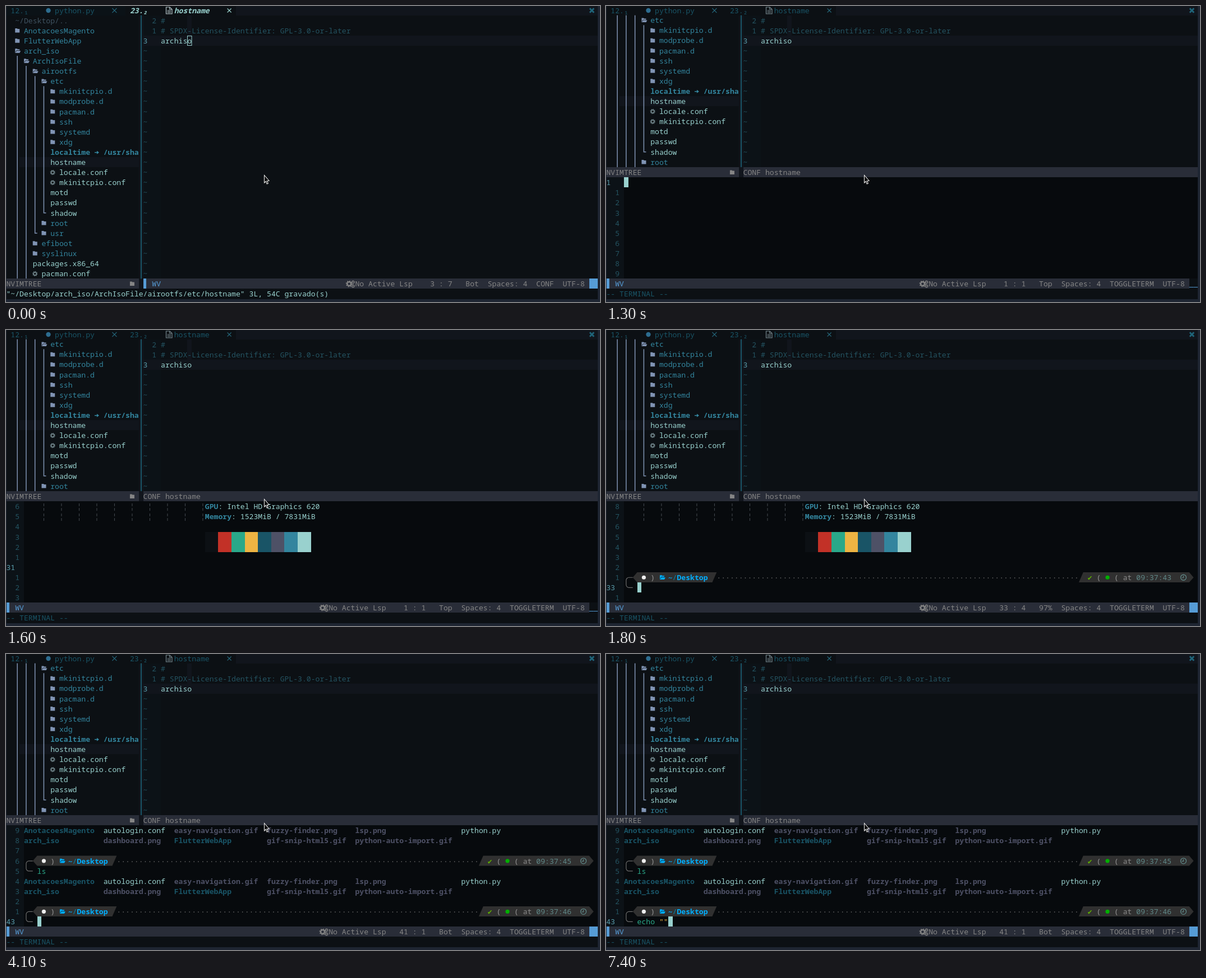
Recreate the animation shown at these times as an HTML page with a canvas. Size 1059x529 px, loop 8000 ms.

```html
<!DOCTYPE html>
<html lang="en">
<head>
<meta charset="utf-8">
<title>Editor with terminal</title>
<style>
html, body { margin: 0; width: 100%; height: 100%; overflow: hidden; background: #0c1014; }
canvas { display: block; }
</style>
</head>
<body>
<canvas id="stage" width="1059" height="529"></canvas>
<script>
const g = document.getElementById('stage').getContext('2d');
const CW = 7.873, RH = 18.1, LOOP = 8000;
const BG = '#0c1014', RAISED = '#11151c', GUTTER = '#0c1217', TERM = '#070a0d', BAR = '#292d38',
  FG = '#99d1ce', CYAN = '#33859e', BLUE = '#195466', DIM = '#245361', NUM = '#599cab', GREY = '#858585',
  RED = '#c23127', GREEN = '#2aa889', YELLOW = '#edb443', VIOLET = '#4e5166', STEEL = '#8094b4',
  ACCENT = '#569cd6', SEG = '#303030', SKY = '#00afff';

const X = col => 0.5 + col * CW;
const Y = row => row * RH - 1.5;
const MX = col => X(col + 0.5);
const MY = row => Y(row + 0.5) + 0.3;

function text(row, col, str, color, style = '') {
  g.font = `${style} 13.12px "Noto Sans Mono", "DejaVu Sans Mono", monospace`;
  g.fillStyle = color;
  const y = Math.round(Y(row) + 14);
  [...str].forEach((ch, i) => ch !== ' ' && g.fillText(ch, X(col + i), y));
}
function box(row, col, cols, rows, color) {
  const x = Math.round(X(col)), y = Math.round(Y(row));
  g.fillStyle = color;
  g.fillRect(x, y, Math.round(X(col + cols)) - x, Math.round(Y(row + rows)) - y);
}
function poly(color, ...p) {
  g.fillStyle = color;
  g.beginPath();
  for (let i = 0; i < p.length; i += 2) g.lineTo(p[i], p[i + 1]);
  g.fill();
}
function line(color, width, ...p) {
  g.strokeStyle = color;
  g.lineWidth = width;
  g.beginPath();
  for (let i = 0; i < p.length; i += 2) g.lineTo(p[i], p[i + 1]);
  g.stroke();
}
function dot(x, y, r, color) {
  g.fillStyle = color;
  g.beginPath();
  g.arc(x, y, r, 0, 7);
  g.fill();
}
function ring(x, y, r, width, color) {
  g.strokeStyle = color;
  g.lineWidth = width;
  g.beginPath();
  g.arc(x, y, r, 0, 2 * Math.PI);
  g.stroke();
}
function gear(x, y, r, color) {
  ring(x, y, r * 0.62, r * 0.4, color);
  g.setLineDash([r * Math.PI / 9, r * Math.PI / 9]);
  ring(x, y, r * 0.9, r * 0.35, color);
  g.setLineDash([]);
}
function folder(x, y, color, open) {
  poly(color, x, y - 4, x + 3.5, y - 4, x + 4.5, y - 3, x + 8, y - 3, x + 8, y + 3.5, x, y + 3.5);
  if (open) {
    line(BG, 1, x + 1, y + 2.5, x + 2.5, y - 0.5, x + 9, y - 0.5);
    poly(color, x + 2.6, y, x + 10, y, x + 8, y + 3.5, x + 1, y + 3.5);
  }
}
function cross(x, y, r, color, width = 1.1) {
  line(color, width, x - r, y - r, x + r, y + r);
  line(color, width, x - r, y + r, x + r, y - r);
}

// [depth, kind, name]; kinds: d folder, o open folder, c config, f file, l link
const tree = [
  [0, 'd', 'AnotacoesMagento'], [0, 'd', 'FlutterWebApp'], [0, 'o', 'arch_iso'], [1, 'o', 'ArchIsoFile'],
  [2, 'o', 'airootfs'], [3, 'o', 'etc'],
  ...['mkinitcpio.d', 'modprobe.d', 'pacman.d', 'ssh', 'systemd', 'xdg'].map(n => [4, 'd', n]),
  [4, 'l', 'localtime   /usr/sha'], [4, 'f', 'hostname'], [4, 'c', 'locale.conf'], [4, 'c', 'mkinitcpio.conf'],
  [4, 'f', 'motd'], [4, 'f', 'passwd'], [4, 'f', 'shadow'], [3, 'd', 'root'], [3, 'd', 'usr'],
  [2, 'd', 'efiboot'], [2, 'd', 'syslinux'], [2, 'f', 'packages.x86_64'], [2, 'c', 'pacman.conf']
];
// Guides by depth: first row, last row, closed with a corner
const guides = [[5, 27], [6, 27], [7, 22, true], [8, 20, true]];

function drawTree(scroll, rows) {
  g.save();
  g.beginPath();
  g.rect(0, Y(1), X(30), rows * RH);
  g.clip();
  g.translate(0, -Math.round(scroll * RH));
  text(1, 2, '~/Desktop/..', '#3f5260');
  box(15, 3, 27, 1, RAISED);
  tree.forEach(([depth, kind, name], i) => {
    const row = i + 2, col = 2 + depth * 2, dir = 'do'.includes(kind);
    if (dir) folder(X(col), MY(row), STEEL, kind === 'o');
    if (kind === 'c') gear(MX(col), MY(row), 4.3, '#6d8086');
    text(row, 'dco'.includes(kind) ? col + 2 : col, name, dir || kind === 'l' ? CYAN : FG, kind === 'l' ? 'bold' : '');
    if (kind === 'l') {
      const x = X(col + 10), y = MY(row) + 0.5;
      line(CYAN, 1.6, x, y, x + 7, y);
      poly(CYAN, x + 4, y - 3, x + 8, y, x + 4, y + 3);
    }
  });
  guides.forEach(([from, to, corner], i) => {
    const x = MX(2 + i * 2);
    if (corner) line(STEEL, 1.5, x, Y(from), x, MY(to), x + 4, MY(to));
    else line(STEEL, 1.5, x, Y(from), x, Y(to));
  });
  g.restore();
}

function drawTabs(active) {
  box(0, 0, 134, 1, RAISED);
  box(0, 0, 52, 1, active ? '#0b1217' : BG);
  if (active) box(0, 27, 25, 1, BG);
  const color = active ? FG : BLUE, style = active ? 'italic bold' : '';
  text(0, 1, '12.₁', BLUE);
  dot(75.5, 8, 4.2, '#2d6d90');
  text(0, 11, 'python.py', BLUE);
  cross(MX(24), 8, 4, '#246478');
  text(0, 28, '23.₂', color, style);
  const doc = active ? '#b4c4c8' : '#75858c';
  line(doc, 1.2, 285.5, 2, 292, 2, 296, 6, 296, 14, 285.5, 14, 285.5, 1.5);
  line(doc, 1, 291.5, 2, 291.5, 6, 296, 6);
  [8, 10, 12].forEach(y => line(doc, 0.9, 287.5, y, 294, y));
  text(0, 38, 'hostname', color, style);
  cross(MX(50), 8, 3.5, active ? FG : '#246478');
  cross(1044.5, 8, 3.7, '#1f6479', 3);
}

function drawEditor(rows, cursor) {
  box(1, 30, 1, rows + 1, RAISED);
  box(1, 31, 4, rows, GUTTER);
  box(3, 31, 103, 1, RAISED);
  box(1, 41, 1, 2, RAISED);
  text(1, 33, '2 #', DIM);
  text(2, 33, '1', DIM);
  text(2, 35, '# SPDX-License-Identifier: GPL-3.0-or-later', DIM);
  text(3, 31, '3', NUM);
  if (cursor === 'solid') box(3, 41, 1, 1, FG);
  text(3, 35, 'archiso', FG);
  if (cursor === 'solid') text(3, 41, 'o', BG);
  if (cursor === 'hollow') {
    g.strokeStyle = FG;
    g.lineWidth = 1;
    g.strokeRect(323.5, 53.5, 7.5, 17);
  }
  for (let r = 4; r <= rows; r++) text(r, 31, '~', DIM);
  line(BLUE, 2, 241, Y(1), 241, Y(rows + 1));
}

function treeStatus(row) {
  box(row, 0, 30, 1, BAR);
  text(row, 0, 'NVIMTREE', GREY);
  folder(X(28), MY(row), GREY);
}
function status(start, lsp, items, full) {
  box(27, start, 132 - start, 1, BAR);
  box(27, start, 0.7, 1, ACCENT);
  text(27, start + 2, 'WV', ACCENT);
  const x = X(lsp - 2), y = MY(27);
  gear(x + 5, y, 5.5, GREY);
  gear(x + 12, y - 3, 3, GREY);
  gear(x + 12, y + 4, 3, GREY);
  text(27, lsp, 'No Active Lsp', GREY);
  items.forEach(([col, str]) => text(27, col, str, GREY));
  text(27, 126, 'UTF-8', GREY);
  if (full) box(27, 132, 2, 1, ACCENT);
  else text(27, 132, '__', ACCENT);
}

function prompt(row, time) {
  const top = Y(row), bottom = Y(row + 1), mid = MY(row), x = MX(4);
  g.strokeStyle = '#6c6c6c';
  g.lineWidth = 1.2;
  g.beginPath();
  g.moveTo(X(6), mid);
  g.arcTo(x, mid, x, bottom, 5);
  g.arcTo(x, mid + RH, X(6), mid + RH, 5);
  g.lineTo(X(6), mid + RH);
  g.stroke();
  poly(SEG, X(6), mid, X(7), top, X(25), top, X(24), bottom, X(7), bottom);
  dot(MX(8), mid, 3.6, '#eeeeee');
  text(row, 10, ')', '#949494');
  folder(X(12) + 1, mid, SKY, true);
  text(row, 14, '~', SKY, 'bold');
  text(row, 15, '/', '#0087af');
  text(row, 16, 'Desktop', SKY, 'bold');
  text(row, 25, '·'.repeat(82), '#6c6c6c');
  poly(SEG, X(107), bottom, X(108), top, X(132), top, X(133), mid, X(132), bottom);
  text(row, 109, '✔', '#5faf00');
  text(row, 111, '(', '#949494');
  dot(MX(113), mid, 3.6, '#00af00');
  text(row, 115, '(', '#949494');
  text(row, 117, 'at', '#8a8a8a');
  text(row, 120, time, '#5f8787');
  ring(1029.5, mid, 5, 1.3, '#5f8787');
  line('#5f8787', 1.2, 1029.5, mid - 3, 1029.5, mid + 0.5, 1026.5, mid + 0.5);
}

const swatches = [BG, RED, GREEN, YELLOW, BLUE, VIOLET, CYAN, FG];
const info = (label, value) => row => {
  text(row, 45, label, CYAN, 'bold');
  text(row, 45 + label.length, ': ' + value, FG);
};
const guided = draw => row => {
  text(row, 8, '¦   '.repeat(10), '#4a5056');
  draw(row);
};
const palette = row => swatches.forEach((c, i) => box(row, 45 + i * 3, 3, 1, c));
const ls = row => text(row, 7, 'ls', GREEN);
const at = time => row => prompt(row, '09:37:' + time);
const names = (...list) => row => list.forEach(([col, name]) => {
  const color = /(png|gif)$/.test(name) ? VIOLET : /\./.test(name) ? FG : BLUE;
  text(row, col, name, color, color === FG ? '' : 'bold');
});
const files1 = names([4, 'AnotacoesMagento'], [22, 'autologin.conf'], [38, 'easy-navigation.gif'],
  [59, 'fuzzy-finder.png'], [79, 'lsp.png'], [103, 'python.py']);
const files2 = names([4, 'arch_iso'], [22, 'dashboard.png'], [38, 'FlutterWebApp'],
  [59, 'gif-snip-html5.gif'], [79, 'python-auto-import.gif']);

// Terminal buffer by line number
const buffer = {
  15: info('Kernel', '5.11.13-arch1-1'),
  16: info('Uptime', '13 hours, 35 mins'),
  17: row => { dot(185.5, MY(row), 40, CYAN); info('Packages', '1243 (pacman)')(row); },
  18: info('Shell', 'zsh 5.8'),
  19: info('Resolution', '1366x768'),
  20: guided(info('WM', 'bspwm')),
  21: guided(info('Theme', 'Pop-nord-dark [GTK2/3]')),
  22: guided(info('Icons', 'Breeze-Noir-White-Blue [GTK2/3]')),
  23: guided(info('Terminal', 'Neovim Terminal')),
  25: guided(info('GPU', 'Intel HD Graphics 620')),
  26: guided(info('Memory', '1523MiB / 7831MiB')),
  28: palette, 29: palette,
  32: at(43), 33: ls, 34: files1, 35: files2,
  37: at(45), 38: ls, 39: files1, 40: files2,
  42: at(46)
};
// time, top line, cursor line, cursor column (-1 hidden), position, scroll label
const views = [
  [1300, 1, 1, 4, '1 : 1', 'Top'],
  [1500, 15, 24, -1, '1 : 1', 'Top'],
  [1600, 25, 31, -1, '1 : 1', 'Top'],
  [1700, 25, 33, -1, '33 : 4', '97%'],
  [1800, 25, 33, 7, '33 : 4', '97%'],
  [3200, 29, 38, 7, '37 : 1', 'Bot'],
  [4000, 32, 41, 4, '41 : 1', 'Bot'],
  [4100, 34, 43, 7, '41 : 1', 'Bot']
];
const keys = [5900, 6100, 6200, 6300, 6500, 7200, 7400];

function drawTerminal(t) {
  const [, first, current, col, pos, label] = views.filter(v => v[0] <= t).pop();
  box(17, 0, 134, 10, TERM);
  box(17, 0, 4, 10, GUTTER);
  for (let i = 0; i < 10; i++) {
    const n = first + i, row = 17 + i;
    if (n === current) text(row, 0, '' + n, NUM);
    else text(row, 2, '' + Math.abs(n - current), DIM);
    if (n < current && buffer[n]) buffer[n](row);
  }
  const row = 17 + current - first;
  const typed = 'echo ""'.slice(0, keys.filter(k => k <= t).length);
  const known = typed.length > 3;
  text(row, 7, typed.slice(0, 4), known ? GREEN : RED, known ? '' : 'bold');
  text(row, 12, typed.slice(5), YELLOW);
  if (col >= 0) box(row, col + typed.length, 1, 1, FG);
  status(0, 73, [[pos.length > 5 ? 89 : 90, pos], [98, label], [103, 'Spaces: 4'], [114, 'TOGGLETERM']], label !== 'Top');
  text(28, 0, '-- TERMINAL --', BLUE);
}

function drawMouse() {
  g.beginPath();
  [[460.5, 302.5], [460.5, 316], [463.3, 313.3], [465.2, 318], [467.3, 317], [465.4, 312.6], [469, 312.2]]
    .forEach(p => g.lineTo(...p));
  g.closePath();
  g.fillStyle = '#000';
  g.fill();
  g.strokeStyle = '#e8e8e8';
  g.lineWidth = 1.1;
  g.stroke();
}

function draw(t) {
  const split = t >= 1300;
  g.fillStyle = BG;
  g.fillRect(0, 0, 1059, 529);
  drawTabs(!split);
  drawTree(split ? 6 : 0, split ? 15 : 26);
  drawEditor(split ? 15 : 26, split ? '' : t < 400 ? 'hollow' : 'solid');
  if (split) {
    treeStatus(16);
    box(16, 31, 103, 1, BAR);
    text(16, 31, 'CONF hostname', GREY);
    drawTerminal(t);
  } else {
    treeStatus(27);
    status(31, 79, [[96, '3 : 7'], [104, 'Bot'], [109, 'Spaces: 4'], [120, 'CONF']], true);
    text(28, 0, '"~/Desktop/arch_iso/ArchIsoFile/airootfs/etc/hostname" 3L, 54C gravado(s)', FG);
  }
  g.fillStyle = '#1e2532';
  g.fillRect(0, 0, 1, 529);
  g.fillRect(1055, 0, 4, 529);
  g.fillRect(0, 524, 1059, 5);
  drawMouse();
}

const start = performance.now();
function tick() {
  draw((performance.now() - start) % LOOP);
  requestAnimationFrame(tick);
}
tick();
</script>
</body>
</html>
```
